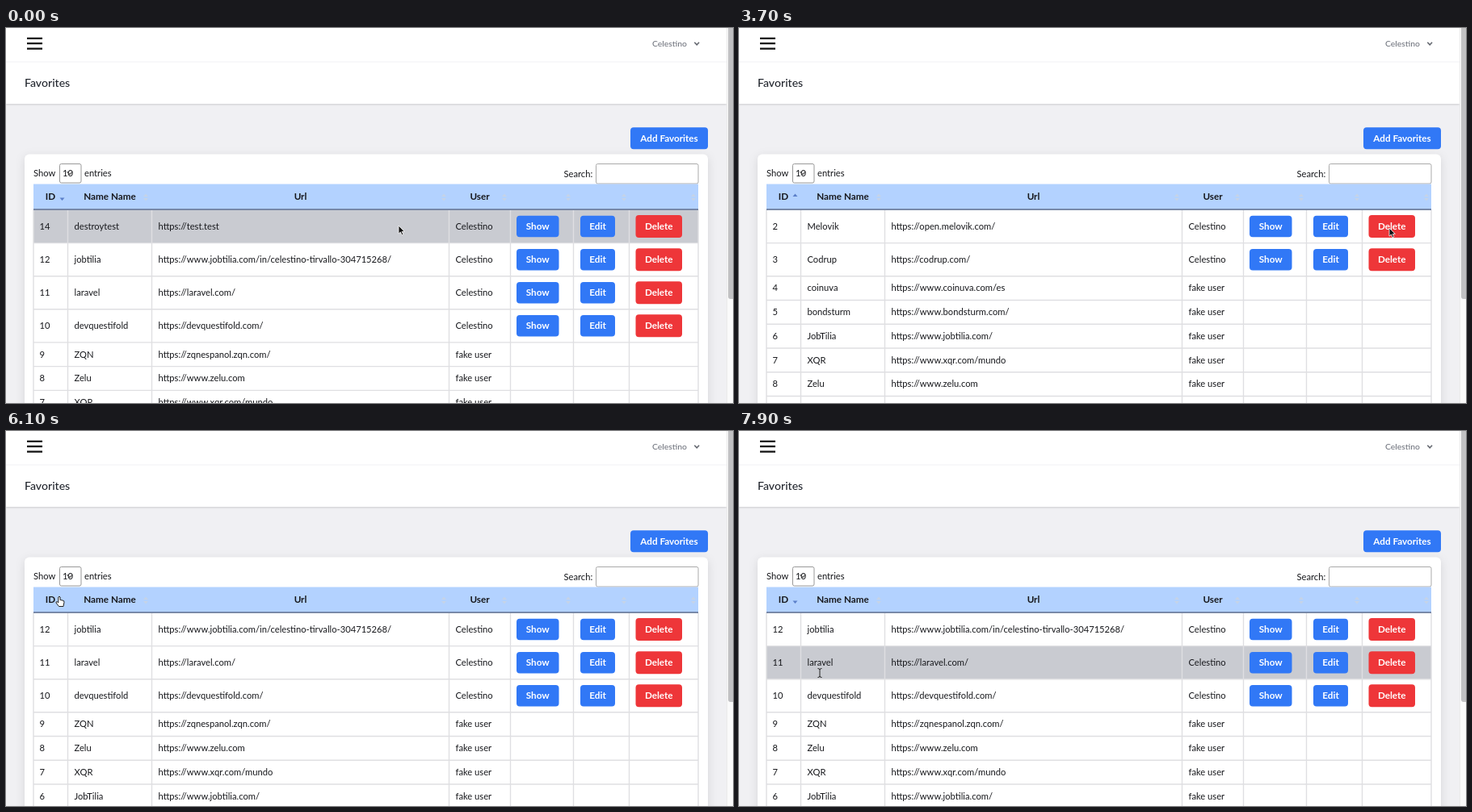
These frames come from a looping animation (900 by 465 pixels, 8 s). An HTML page:

```html
<!DOCTYPE html>
<html lang="en">
<head>
<meta charset="utf-8">
<title>Favorites</title>
<style>
  html, body { margin: 0; width: 100%; height: 100%; overflow: hidden; background: #f0f0f3; }
  svg { display: block; width: 100%; height: 100%; }
  text { font: 11.2px Lato, "Noto Sans", sans-serif; fill: #17181c; }
  .bold { font-size: 11.7px; font-weight: 700; }
  .center { text-anchor: middle; }
  .light { fill: #fff; }
  .card { filter: drop-shadow(0 3px 6px #0000001c); }
  .bar { filter: drop-shadow(0 1px 1.2px #00000026); }
</style>
</head>
<body>
<svg viewBox="0 0 900 465">
  <rect width="900" height="465" fill="#f0f0f3"/>
  <rect class="bar" width="892" height="94" fill="#fff"/>
  <path d="M0 42H892" stroke="#f1f1f4"/>
  <path d="M26 12.8H45M26 19.2H45M26 25.6H45" stroke="#111" stroke-width="2.2"/>
  <text x="800" y="22.5" style="font-size:10.4px;font-weight:500;fill:#737780">Celestino</text>
  <path d="M852.3 17.8L855.2 20.8L858.1 17.8" fill="none" stroke="#62666e" stroke-width="1.5"/>
  <text x="23" y="73.3" style="font-size:14.1px;font-weight:500;fill:#23272f">Favorites</text>
  <rect class="card" x="23" y="156.5" width="846" height="330" rx="6" fill="#fff"/>
  <text x="34" y="183.8">Show</text>
  <rect x="66.5" y="168.5" width="26.5" height="23.5" rx="2" fill="#fff" stroke="#999"/>
  <text x="70" y="183.8">10</text>
  <path d="M75.5 178.3L79 181.5L82.5 178.3" fill="none" stroke="#555" stroke-width="1.2"/>
  <text x="97" y="183.8">entries</text>
  <text x="690.5" y="184.5">Search:</text>
  <rect x="730.5" y="168.5" width="126.5" height="24.5" rx="2" fill="#fff" stroke="#aaa"/>
  <g id="buttonTop"></g>
  <g id="table"></g>
  <rect x="892" width="8" height="465" fill="#fafafa"/>
  <path d="M892.5 0V465" stroke="#eaeaea"/>
  <path d="M894 0H900V336H897Q894 336 894 333Z" fill="#c1c1c3"/>
  <g id="cursor">
    <path id="arrow" d="M0 0V10.2L2.4 8L4 11.7L5.8 10.9L4.2 7.4H7.3Z" fill="#111" stroke="#fff" stroke-width=".8"/>
    <path id="hand" d="M-1.2 1Q0 -.8 1.1 1V4.5L4 5Q6.2 5.3 6 7.2L5 12.5H-.5L-4 8Q-4.3 6.3 -2.7 6.7L-1.2 8Z" fill="#fff" stroke="#222" stroke-width="1"/>
    <path id="beam" d="M-2.5 -5.5Q0 -5.5 0 -4Q0 -5.5 2.5 -5.5M0 -4V4M-2.5 5.5Q0 5.5 0 4Q0 5.5 2.5 5.5" fill="none" stroke="#222"/>
  </g>
</svg>
<script>
const el = id => document.getElementById(id);
const blue = '#3178f6', red = '#ee3639';
const LOOP = 8000, STEP = 100, TOP = 225.5;
const columns = [34, 76.5, 180.5, 548.5, 624.5, 702.5, 771.5, 857];

// id: [name, address, owned by the signed-in account]
const favorites = {
  2: ['Melovik', 'https://open.melovik.com/', true],
  3: ['Codrup', 'https://codrup.com/', true],
  4: ['coinuva', 'https://www.coinuva.com/es'],
  5: ['bondsturm', 'https://www.bondsturm.com/'],
  6: ['JobTilia', 'https://www.jobtilia.com/'],
  7: ['XQR', 'https://www.xqr.com/mundo'],
  8: ['Zelu', 'https://www.zelu.com'],
  9: ['ZQN', 'https://zqnespanol.zqn.com/'],
  10: ['devquestifold', 'https://devquestifold.com/', true],
  11: ['laravel', 'https://laravel.com/', true],
  12: ['jobtilia', 'https://www.jobtilia.com/in/celestino-tirvallo-304715268/', true],
  14: ['destroytest', 'https://test.test', true]
};
const ascending = [2, 3, 4, 5, 6, 7, 8, 9];
const descending = [12, 11, 10, 9, 8, 7, 6];

// Each entry: start time, value
const orders = [[0, [14, ...descending]], [3600, ascending], [6100, descending]];
const hovers = [[0, 0], [3600, -1], [4600, 0], [5400, -1], [7000, 0], [7300, 1], [7400, 2],
  [7500, 3], [7600, 2], [7700, 1], [7800, 0], [7900, 1]];
const pointers = [[0, 'arrow'], [5400, 'hand'], [7000, 'arrow'], [7900, 'beam']];

// Cursor path: time, x, y
const path = [[0, 486, 245], [300, 486, 245], [1200, 703, 245], [1500, 724, 244], [1600, 724, 244],
  [2400, 805, 248], [4500, 805, 248], [5500, 123, 218], [5900, 66, 205], [6600, 66, 205],
  [6900, 74, 222], [7200, 94, 274], [7400, 102, 338], [7500, 109, 335], [7600, 106, 302],
  [7700, 103, 266], [7800, 100, 268], [7900, 100, 300]];

const text = (x, y, label, cls = '') => `<text x="${x}" y="${y + 3.8}" class="${cls}">${label}</text>`;
const rect = (x, y, w, h, fill, rx = 0) =>
  `<rect x="${x}" y="${y}" width="${w}" height="${h}" fill="${fill}" rx="${rx}"/>`;
const line = (d, color, width) => `<path d="${d}" stroke="${color}" stroke-width="${width}"/>`;
const button = (x, y, w, h, fill, label) =>
  rect(x, y - h / 2, w, h, fill, 4) + text(x + w / 2, y, label, 'bold center light');
const triangle = (x, y, up, color) =>
  `<path d="M${x - 3} ${y}h6l-3 ${up ? -3.6 : 3.6}z" fill="${color}"/>`;

function header(isAscending) {
  const labels = [[55, 'ID'], [128.5, 'Name Name'], [364.5, 'Url'], [586.5, 'User']];
  const sortable = [173, 542, 617, 696, 765, 851];
  return rect(34, 193.5, 823, 32, '#b3d2ff')
    + labels.map(([x, label]) => text(x, 209, label, 'bold center')).join('')
    + sortable.map(x => triangle(x, 209, true, '#c5d3e8') + triangle(x, 211, false, '#c5d3e8')).join('')
    + triangle(69.5, isAscending ? 209 : 210.5, isAscending, '#5b7fc9')
    + line('M34 225H857', '#5f6e8c', 1.4);
}

function drawTable(ids, hovered) {
  let y = TOP, body = '', rules = '';
  ids.forEach((id, i) => {
    const [name, url, own] = favorites[id];
    const height = own ? 41.1 : 29.75, mid = y + height / 2;
    if (i === hovered) body += rect(34, y, 823, height, '#c9cbd1');
    body += text(41.5, mid, id) + text(84.5, mid, name) + text(188.5, mid, url)
      + text(556.5, mid, own ? 'Celestino' : 'fake user');
    if (own) body += button(632, mid, 52.5, 26.5, blue, 'Show')
      + button(711, mid, 43, 26.5, blue, 'Edit')
      + button(779.5, mid, 57.5, 28, red, 'Delete');
    y += height;
    rules += `M34 ${y}H857`;
  });
  rules += columns.map(x => `M${x} ${TOP}V${y}`).join('');
  return body + line(rules, '#dfdfe2', 1.4) + header(ids === ascending);
}

const valueAt = (list, t) => list.findLast(([start]) => start <= t)[1];

function cursorAt(t) {
  const next = path.findIndex(([time]) => time > t);
  if (next < 0) return path[path.length - 1].slice(1);
  const [t0, x0, y0] = path[next - 1], [t1, x1, y1] = path[next];
  const k = (t - t0) / (t1 - t0), ease = t1 - t0 > 300 ? k * k * (3 - 2 * k) : k;
  return [x0 + (x1 - x0) * ease, y0 + (y1 - y0) * ease];
}

let shown = '';
function render(now) {
  const t = Math.floor(now % LOOP / STEP) * STEP;
  const ids = valueAt(orders, t), hovered = valueAt(hovers, t), pointer = valueAt(pointers, t);
  const state = ids + '/' + hovered;
  if (state !== shown) el('table').innerHTML = drawTable(ids, hovered);
  shown = state;
  for (const kind of ['arrow', 'hand', 'beam']) el(kind).style.display = kind === pointer ? '' : 'none';
  el('cursor').setAttribute('transform', `translate(${cursorAt(t)})`);
}

el('buttonTop').innerHTML = button(773, 136.7, 96, 27, blue, 'Add Favorites');
const start = performance.now();
function tick() {
  render(performance.now() - start);
  requestAnimationFrame(tick);
}
tick();
</script>
</body>
</html>
```
